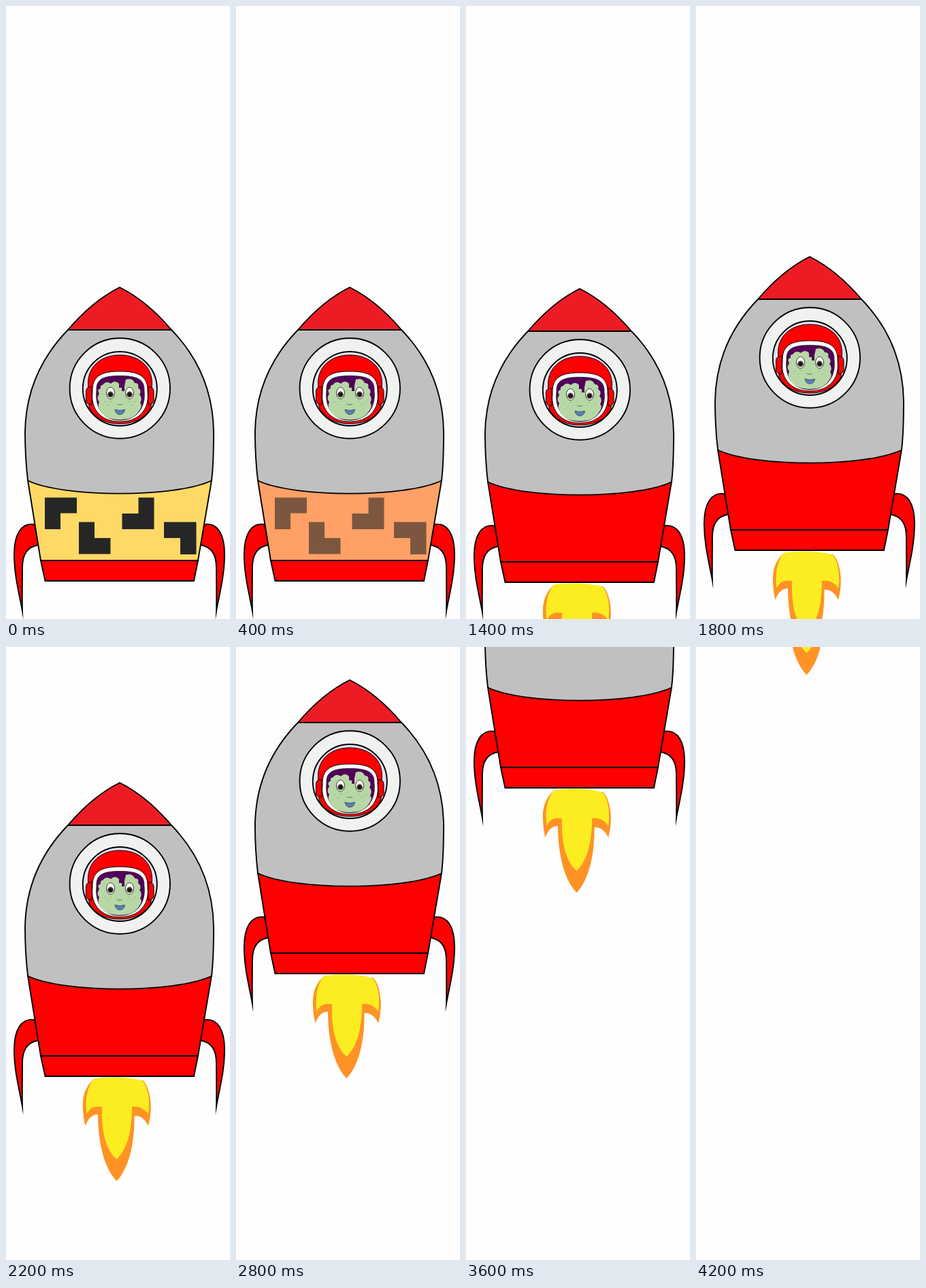
Recreate the animation shown at these times as an HTML page without scripts. Size 329x901 px, loop 4400 ms.

```html
<!DOCTYPE html>
<html lang="en">
<head>
<meta charset="utf-8">
<title>Rocket launch</title>
<style>
  html, body { margin: 0; width: 100%; height: 100%; overflow: hidden; background: #fefefe; }
  svg { display: block; width: 329px; height: 901px; }
  .line { stroke: #000; stroke-width: 2.4; }
  .mid { stroke: #000; stroke-width: 1.9; }
  .thin { stroke: #000; stroke-width: 1; }
  .red { fill: #f00; }
</style>
</head>
<body>
<svg viewBox="0 0 329 901">
  <defs>
    <path id="fin" class="red mid" stroke-miterlimit="14" d="M42 762C22 759 12 777 12 806C12 838 20 866 24 889C23.500 868 24 850 24 826C24 806 31 795 48 792Z"/>
    <path id="hull" d="M167 413.500C140 427 113 450 91 476C58 510 29 558 28 626C28 655 30 680 32 697L51 815H282L302 697C304 680 305 655 305 626C304 558 276 510 243 476C221 450 194 427 167 413.500Z"/>
    <clipPath id="inHull"><use href="#hull"/></clipPath>
    <clipPath id="inPort"><circle cx="167.3" cy="562.5" r="54"/></clipPath>
    <g id="eye">
      <ellipse cx="153.500" cy="569" rx="6" ry="8.500" fill="#fff" stroke="#222" stroke-width=".9"/>
      <circle cx="153.500" cy="571" r="4.400" fill="#4b4038"/>
      <circle cx="153.500" cy="571" r="2.500" fill="#111"/>
    </g>
  </defs>

  <!-- every value list holds one entry per 200 ms step -->
  <g>
    <animateTransform attributeName="transform" type="translate" dur="4.4s" repeatCount="indefinite" calcMode="discrete"
      values="0 0;0 0;0 0;0 0;0 0;0 0;0 0;0 2;0 -21;0 -45;0 -129;0 -214;0 -262;0 -299;0 -365;0 -402;0 -467;0 -550;0 -638;0 -716;0 -824;0 -958"/>

    <g transform="translate(0 214)" visibility="hidden">
      <animate attributeName="visibility" dur="4.4s" repeatCount="indefinite" calcMode="discrete"
        keyTimes="0;.27273" values="hidden;visible"/>
      <path fill="#ff9225" d="M129 635C117 645 112 661 113 676C113 688 115 697 116.500 704C121 692 127 687 135 687C135 722 142 764 162.500 785C181 766 189 728 188.500 689C198 688 205 695 209 704C213 690 214 672 211 659C209 648 205 640 201 637Z"/>
      <path fill="#fbed21" d="M129 634.500C118 648 116 668 118.500 687C123 677 130 674 141 676C140 712 146 738 162.500 753C178 738 185 712 185 676C195 674 204 679 209 687C212 667 209 648 201 638C180 631 148 632 129 634.500Z"/>
    </g>

    <use href="#fin"/>
    <use href="#fin" transform="matrix(-1 0 0 1 333 0)"/>

    <g clip-path="url(#inHull)">
      <path fill="#c0c0c0" d="M20 476H314V740H20Z"/>
      <path class="mid" fill="#ed1c24" d="M20 400H314V476H20Z"/>
      <path class="mid" fill="#ffd966" d="M32 697.500C85 723 249 723 302 697.500V830H32Z">
        <animate attributeName="fill" dur="4.4s" repeatCount="indefinite" calcMode="discrete"
          keyTimes="0;.04545;.09091;.13636;.18182;.22727;.27273"
          values="#ffd966;#ffbc66;#ffa066;#ff8366;#f66;#f33;#f00"/>
      </path>
      <path fill="#262626" d="M57 722.500h47v23h-24v23.500h-23zM107 758.500h23v23.500h23.500v23.500h-46.500zM194.500 722.500h23v46.500h-47v-23h24zM232 758.500h47.500v47.500h-23.500v-24h-24z">
        <animate attributeName="opacity" dur="4.4s" repeatCount="indefinite" calcMode="discrete"
          keyTimes="0;.04545;.09091;.13636;.18182;.22727" values="1;.8;.6;.4;.17;0"/>
      </path>
    </g>
    <use href="#hull" class="mid" fill="none"/>
    <path class="red mid" d="M51 815H282L276 845H57.500Z"/>

    <circle class="mid" cx="167.300" cy="562" r="73.700" fill="#f0f2f0"/>
    <circle cx="167.300" cy="562.500" r="54.500" fill="#dfe2f2"/>
    <g clip-path="url(#inPort)">
      <path class="red thin" d="M121 562C117 532 138 513 167 513C197 513 218 532 214 562L213 590C205 606 188 614 167 614C147 614 130 606 122 590Z"/>
      <path class="red thin" d="M126 560Q118 559 117.500 566V580Q118 586 126 586ZM209 560Q216 559 217 566V580Q216 586 209 586Z"/>
      <path class="thin" fill="#fff" d="M127 568C126 545 138 537 167 537C197 537 209 545 208 568C211 594 194 611 167 611C141 611 124 594 127 568Z"/>
      <path fill="#520058" stroke="#222" stroke-width=".7" d="M133 565C132 549 142 543.500 167 543.500C193 543.500 204 549 203 565C206 590 192 609 167 609C143 609 130 590 133 565Z"/>
      <path fill="#b7d8a6" d="M142 557Q147 550 154 555Q160 549 166 555V561H170V566H174V558L176 549Q186 546 189 554Q196 554 194 561Q200 566 196 571Q201 577 197 583Q201 588 196 594C190 605 180 608 167 608C152 608 142 603 138 594Q134 588 137 582Q132 576 137 570Q133 564 139 562Q138 557 142 557Z"/>
      <use href="#eye"/>
      <use href="#eye" x="28"/>
      <path d="M163 585Q167 588 171 585" fill="none" stroke="#577850" stroke-width="1"/>
      <path d="M160 593Q164 594 167 594.500Q171 594 174.500 593Q174 600 167 600.500Q161 600 160 593Z" fill="#5c7fae" stroke="#333f70" stroke-width=".8"/>
      <path d="M144 582h1.500M149 586h1.500M153 581h1.500M180 581h1.500M184 586h1.500M189 582h1.500" stroke="#789a68"/>
    </g>
    <circle class="mid" cx="167.300" cy="562.500" r="54.500" fill="none"/>
  </g>
</svg>
</body>
</html>
```
